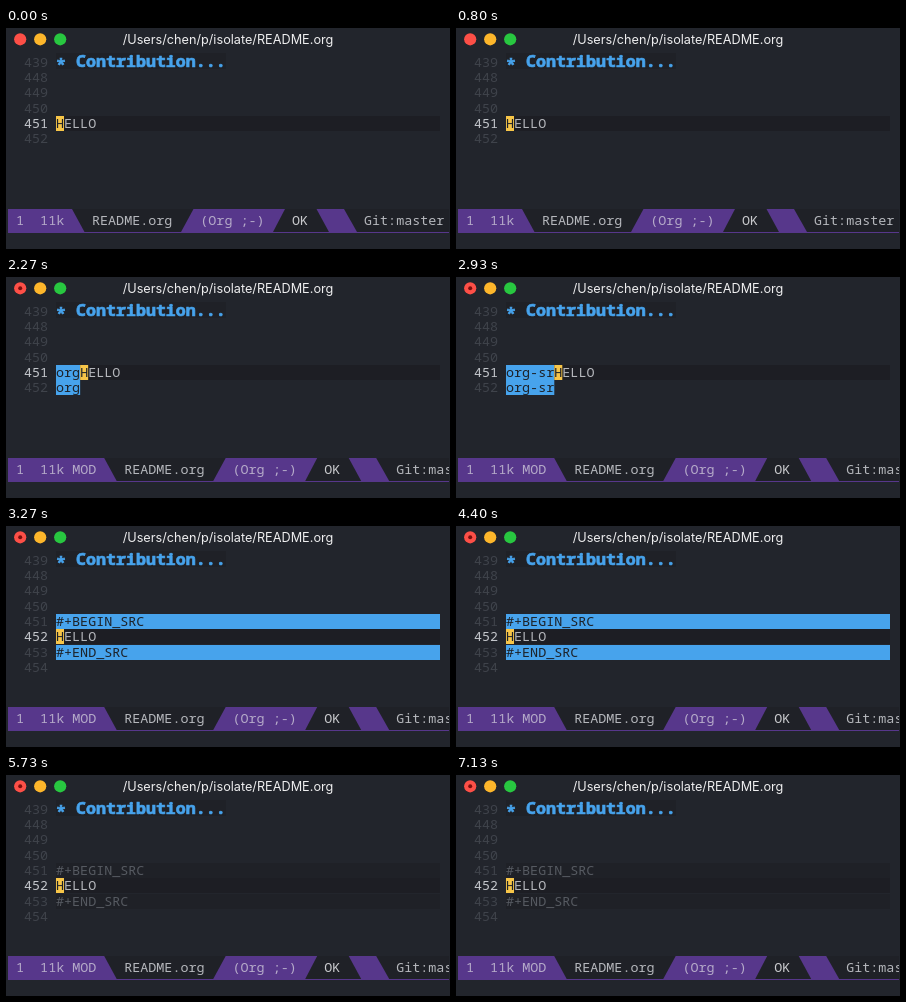
An HTML page with a canvas that plays this animation: 444 px wide and 221 px high, repeating every 7.19 s.

```html
<!DOCTYPE html>
<html lang="en">
<head>
<meta charset="utf-8">
<title>Editor session</title>
<style>
html, body { margin: 0; width: 444px; height: 221px; overflow: hidden; background: #22252c; }
canvas { display: block; }
</style>
</head>
<body>
<canvas id="stage" width="444" height="221"></canvas>
<script>
const ctx = document.getElementById('stage').getContext('2d');
const LOOP = 7190, CHAR = 8.05, ROW = 15.4, LEFT = 50, RIGHT = 434;
const FAMILY = '"Noto Sans Mono", "DejaVu Sans Mono", monospace';
const MONO = '13.4px ' + FAMILY;
const C = {
  bg: '#22252c', line: '#1d1e24', panel: '#1f2127', text: '#b5b7bc', onPurple: '#b5aac9',
  dim: '#565a61', number: '#3f434b', current: '#c3c6cb', blue: '#47a3ec',
  yellow: '#f7c548', purple: '#57378b', ink: '#1d2229'
};

// Typed prefix and the time it appears
const TYPED = [[1730, 'o'], [1870, 'or'], [2000, 'org'], [2400, 'org-'], [2600, 'org-s'], [2800, 'org-sr']];
const MESSAGE = 1070, EXPAND = 3070, FINISH = 5530;

function rect(x, y, w, h, color) {
  ctx.fillStyle = color;
  ctx.fillRect(x, y, w, h);
}

function disc(x, y, r, color) {
  ctx.fillStyle = color;
  ctx.beginPath();
  ctx.arc(x, y, r, 0, 7);
  ctx.fill();
}

function text(str, x, y, color = C.text, font = MONO) {
  ctx.font = font;
  ctx.fillStyle = color;
  ctx.fillText(str, x, y);
}

const rowTop = n => Math.round(88 + (n - 451) * ROW);
const baseline = n => 100 + (n - 451) * ROW;
const band = (n, color) => rect(LEFT, rowTop(n), RIGHT - LEFT, 15, color);

function titleBar(modified) {
  ['#fd4f47', '#fdb62b', '#28c740'].forEach((color, i) => disc(14.2 + i * 20, 11.3, 6.1, color));
  if (modified) disc(14.2, 11.3, 2, '#7a0f0c');
  ctx.textAlign = 'center';
  text('/Users/chen/p/isolate/README.org', 222, 16.3, '#eeeeef', '12.7px Inter, "Open Sans", sans-serif');
  ctx.textAlign = 'left';
}

function heading() {
  const font = '900 16.65px ' + FAMILY;
  rect(LEFT, 25, 170, 16, C.panel);
  ctx.strokeStyle = C.blue;
  ctx.lineWidth = 0.7;
  // The asterisk sits lower than the font places it
  for (const [str, x, y] of [['*', LEFT, 42], ['Contribution...', LEFT + 20, 39.3]]) {
    text(str, x, y, C.blue, font);
    ctx.strokeText(str, x, y);
  }
}

function lineNumbers(current, last) {
  text('439', 18, 39, C.number);
  for (let n = 448; n <= last; n++)
    text(n, 18, baseline(n), n === current ? C.current : C.number);
}

function hello(n, x) {
  text('HELLO', x, baseline(n));
  rect(x, rowTop(n), 8, 15, C.yellow);
  text('H', x, baseline(n), C.ink);
}

function marked(str, n) {
  rect(LEFT, rowTop(n), str.length * CHAR, 15, C.blue);
  text(str, LEFT, baseline(n), C.ink);
}

function block(n, active) {
  for (const [row, str] of [[n, '#+BEGIN_SRC'], [n + 2, '#+END_SRC']]) {
    band(row, active ? C.blue : C.panel);
    text(str, LEFT, baseline(row), active ? C.ink : C.dim);
  }
}

// Purple section given by its top and bottom edges
function section(y, topLeft, topRight, bottomLeft, bottomRight) {
  ctx.fillStyle = C.purple;
  ctx.beginPath();
  ctx.moveTo(topLeft, y);
  ctx.lineTo(topRight, y);
  ctx.lineTo(bottomRight, y + 23);
  ctx.lineTo(bottomLeft, y + 23);
  ctx.fill();
}

function modeLine(y, modified) {
  const base = y + 16;
  ctx.save();
  ctx.beginPath();
  ctx.rect(2, y, 441, 24);
  ctx.clip();
  rect(2, y, 441, 23, C.panel);
  rect(2, y + 23, 441, 1, C.purple);
  text('README.org', 0, -20);
  const dx = modified ? 4 * CHAR : 0;
  section(y, 2, 66 + dx, 2, 78.5 + dx);
  section(y, 187.5 + dx, 279 + dx, 175 + dx, 267 + dx);
  section(y, 310.5 + dx, 338 + dx, 323 + dx, 351 + dx);
  text(modified ? '1  11k MOD' : '1  11k', 10, base, C.onPurple);
  ctx.translate(dx, 0);
  text('README.org', 86, base);
  text('(Org ;-)', 194.3, base, C.onPurple);
  text('OK', 286, base, '#c9cacd');
  text('Git:master', 358, base);
  ctx.restore();
}

function echoMessage() {
  text('BEG: C-c a ] [ Jump END: C-c e ]', 18, 186.2);
  text('Isolate-Add mode enabled in current buffer', 10, 216.6);
  ctx.strokeStyle = C.dim;
  ctx.lineWidth = 1;
  ctx.beginPath();
  ctx.arc(5, 181, 2.5, 2.6, 7.6);
  ctx.lineTo(3, 185);
  ctx.stroke();
}

function draw(t) {
  const typed = TYPED.filter(([at]) => at <= t).map(([, str]) => str).pop() || '';
  const modified = typed !== '';
  const expanded = t >= EXPAND;
  const message = t >= MESSAGE && !modified;
  const current = expanded ? 452 : 451;

  rect(0, 0, 444, 221, C.bg);
  titleBar(modified);
  band(current, C.line);
  lineNumbers(current, expanded ? 454 : 452);
  heading();

  if (expanded) {
    block(451, t < FINISH);
    hello(452, LEFT);
  } else {
    if (modified) {
      marked(typed, 451);
      marked(typed, 452);
    }
    hello(451, LEFT + typed.length * CHAR);
  }

  modeLine(message ? 151 : 181, modified);
  if (message) echoMessage();
}

function tick() {
  draw(performance.now() % LOOP);
  requestAnimationFrame(tick);
}
tick();
</script>
</body>
</html>
```
